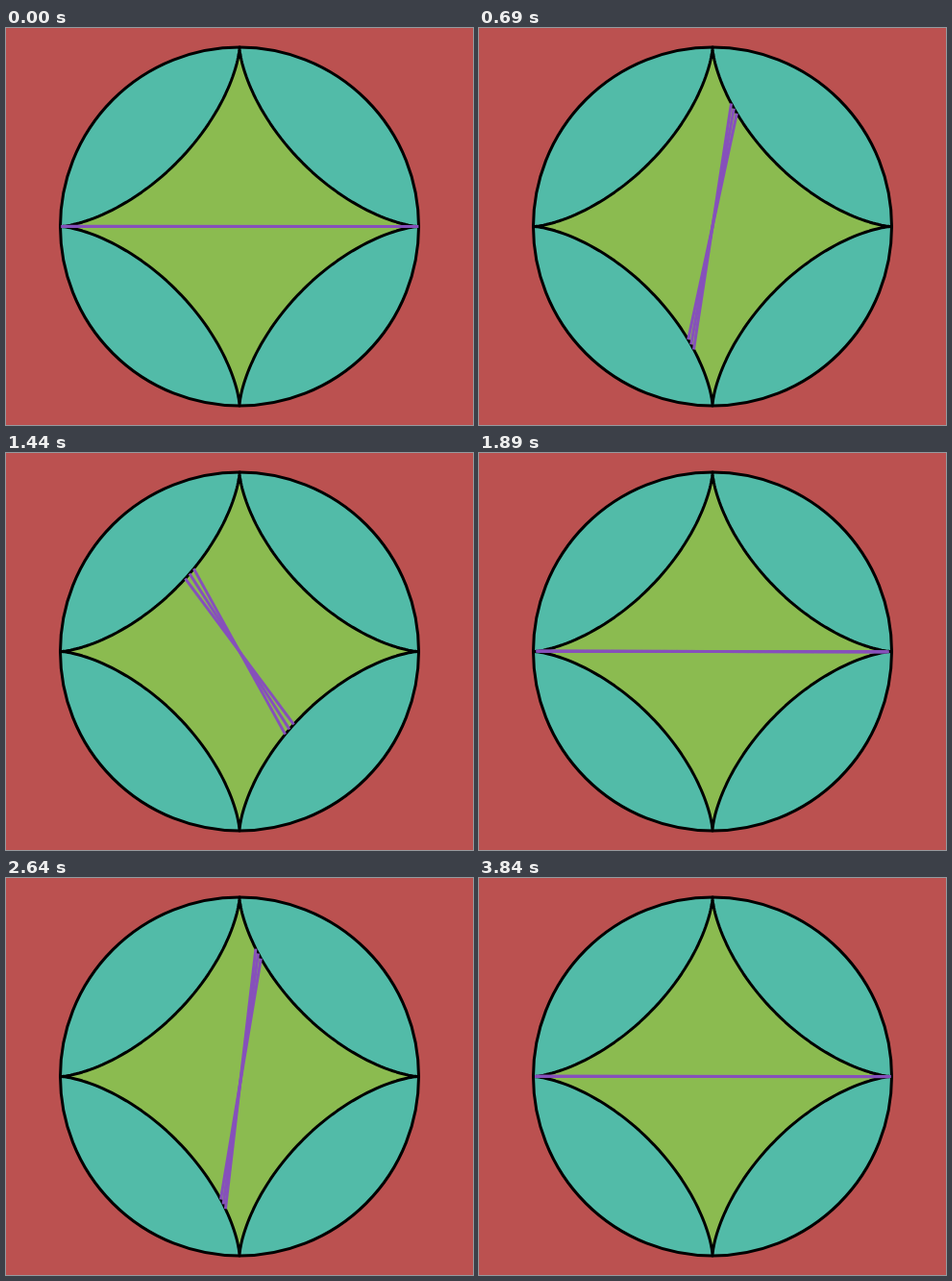
Write an HTML page with a canvas that moves like this. It is 486x413 px and loops after 3.87 s.

```html
<!DOCTYPE html>
<html lang="en">
<head>
<meta charset="utf-8">
<title>Astroid chord</title>
<style>
  html, body { margin: 0; width: 100%; height: 100%; overflow: hidden; background: #bb5150; }
  canvas { display: block; }
</style>
</head>
<body>
<canvas id="stage" width="486" height="413"></canvas>
<script>
const ctx = document.getElementById('stage').getContext('2d');
const CX = 243, CY = 206.5, R = 186.5;
const STEPS = 256, STEP_MS = 30, LOOP_STEPS = 129;

// Closed list: the first and last points coincide.
const points = Array.from({ length: STEPS + 1 }, (_, i) => {
  const a = i / STEPS * 2 * Math.PI;
  return [CX + R * Math.cos(a) ** 3, CY - R * Math.sin(a) ** 3];
});
const pointAt = i => points[(i + points.length) % points.length];

const disc = new Path2D();
disc.arc(CX, CY, R, 0, 2 * Math.PI);

const astroid = new Path2D();
points.slice(0, STEPS).forEach(p => astroid.lineTo(...p));
astroid.closePath();

function drawShape(path, fill) {
  ctx.fillStyle = fill;
  ctx.fill(path);
  ctx.strokeStyle = '#000';
  ctx.stroke(path);
}

function draw(step) {
  ctx.fillStyle = '#bb5150';
  ctx.fillRect(0, 0, 486, 413);
  ctx.lineWidth = 3;
  ctx.lineJoin = 'round';
  drawShape(disc, '#52bba8');
  drawShape(astroid, '#8bbb50');

  // The newest chord and its two predecessors.
  ctx.strokeStyle = '#8650bb';
  for (let lag = 4; lag >= 2; lag--) {
    const i = 2 * step - lag;
    ctx.beginPath();
    ctx.moveTo(...pointAt(i));
    ctx.lineTo(...pointAt(i + STEPS / 2));
    ctx.stroke();
  }
}

function tick() {
  draw(Math.floor(performance.now() / STEP_MS) % LOOP_STEPS);
  requestAnimationFrame(tick);
}
tick();
</script>
</body>
</html>
```
